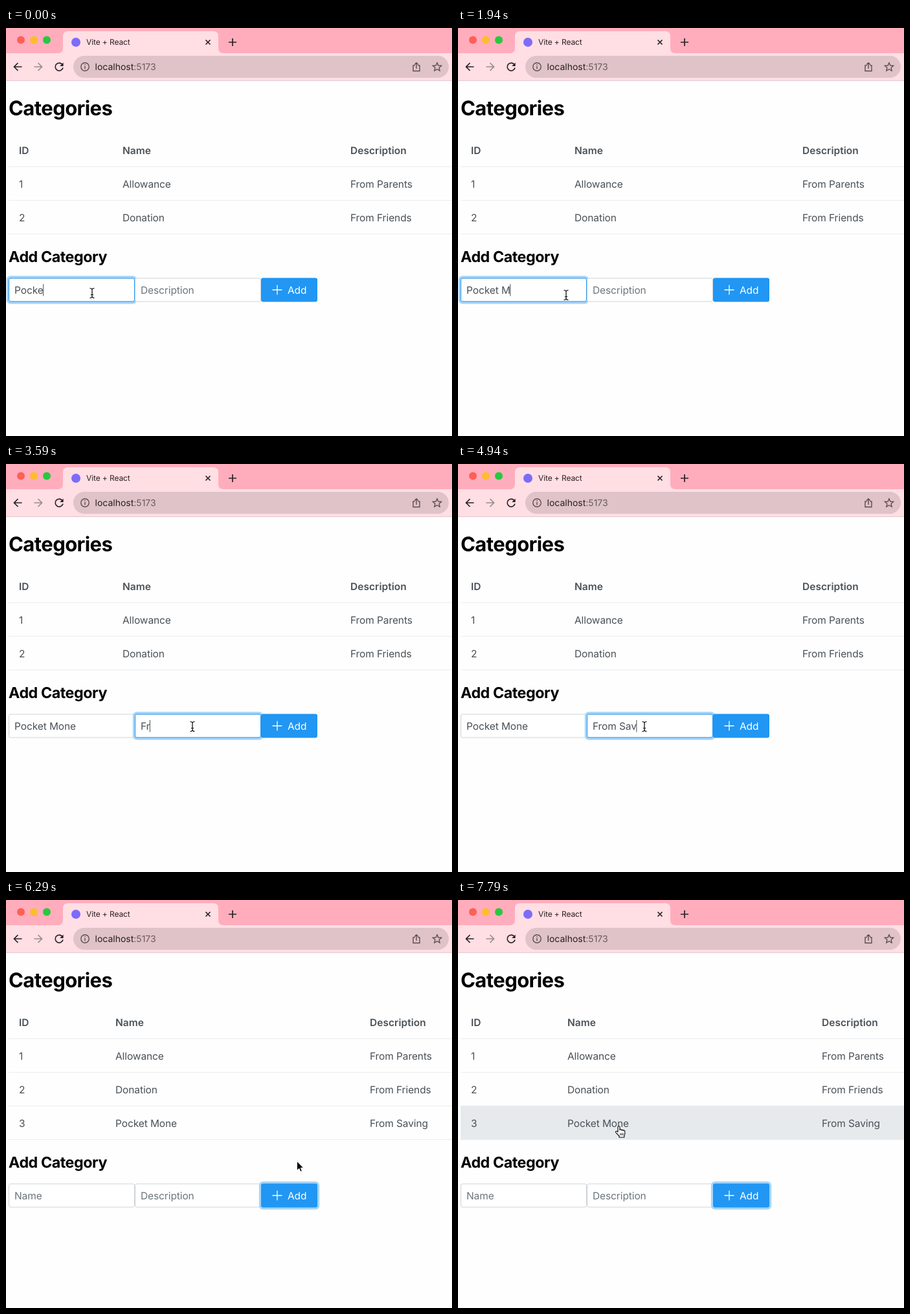
Write an HTML page that moves like this. It is 689 by 631 pixels and loops after 8 s.

```html
<!DOCTYPE html>
<html lang="en">
<head>
<meta charset="utf-8">
<title>Categories</title>
<style>
  html, body { margin: 0; width: 100%; height: 100%; overflow: hidden; background: #fefefe; }
  svg { position: absolute; left: 0; top: 0; display: block; }
  text {
    font: 15.5px Inter, "Open Sans", sans-serif;
    font-optical-sizing: none;
    letter-spacing: -.1px;
    text-rendering: geometricPrecision;
    white-space: pre;
    fill: #495057;
  }
  .th { font-weight: 600; letter-spacing: .05px; }
  .h1 { font-size: 31px; font-weight: 700; letter-spacing: -.58px; fill: #000; }
  .h2 { font-size: 23.3px; font-weight: 700; letter-spacing: -.46px; fill: #000; }
  .tab { font-size: 12px; fill: #2a2023; }
  .url { font-size: 14px; letter-spacing: 0; fill: #2a2023; }
  .port { fill: #6b5b5f; }
  .hint { fill: #6c757d; }
  .light { fill: #fff; }
  .line { fill: none; stroke: #2a2023; stroke-width: 1.7; }
  .rule { fill: none; stroke: #e9ecef; }
  .ring { fill: none; stroke: #a6d5fa; }
  .box { fill: #fff; stroke: #ced4da; }
  .active { fill: none; stroke: #2196f3; }
</style>
</head>
<body>
<svg width="689" height="631" viewBox="0 0 689 631">
  <!-- browser window -->
  <rect width="689" height="39" fill="#ffadbc"/>
  <rect y="39" width="689" height="42" fill="#ffdee4"/>
  <rect y="81" width="689" height="1" fill="#e4cbd0"/>
  <path d="M80 39q8 0 8-8V13q0-8 8-8H320q8 0 8 8V31q0 8 8 8z" fill="#ffdee4"/>
  <circle cx="23" cy="18.5" r="6" fill="#fe5f57"/>
  <circle cx="43" cy="18.5" r="6" fill="#febc2e"/>
  <circle cx="63" cy="18.5" r="6" fill="#28c840"/>
  <circle cx="108" cy="22" r="7" fill="#7d6bfa"/>
  <text class="tab" x="124" y="26.3">Vite + React</text>
  <path class="line" d="M308.5 18.5l7 7m0-7l-7 7"/>
  <path class="line" d="M344 22h12m-6-6v12" stroke-width="2"/>
  <path class="line" d="M24.5 60H12.5m6-6l-6 6l6 6"/>
  <path class="line" d="M43.5 60h12m-6-6l6 6l-6 6" style="stroke:#9d8a8e"/>
  <path class="line" d="M86.8 56.2A6 6 0 1 0 88 61.5"/>
  <path d="M88.6 53.6v5.4h-5.4z" fill="#2a2023"/>
  <rect x="104" y="43" width="580" height="34" rx="17" fill="#dfc3c8"/>
  <g class="line" style="stroke:#5d4d51;stroke-width:1.4">
    <circle cx="122" cy="60" r="6.2"/>
    <path d="M122 59v4.2m0-7.2v1.5"/>
    <path d="M631.5 58H629v8.500h10V58h-2.500M634 63V54m-3 2.700l3-3l3 3"/>
    <path d="M666 53.700l1.900 4.300l4.700.4l-3.500 3.100l1 4.600l-4.100-2.400l-4.100 2.400l1-4.600l-3.500-3.100l4.700-.4z"/>
  </g>
  <text class="url" x="137.500" y="65">localhost<tspan class="port">:5173</tspan></text>

  <!-- page -->
  <text class="h1" x="4" y="134.500">Categories</text>
  <rect id="rowHover" x="4" y="318.500" width="685" height="52" fill="#e6eaed"/>
  <path class="rule" d="M4 214.500H689M4 266.500H689M4 318.500H689"/>
  <g id="table"></g>
  <g id="form">
    <text class="h2" x="4" y="362">Add Category</text>
    <g id="fields"></g>
    <rect id="buttonRing" class="ring" x="394" y="386.500" width="87" height="37" rx="3"/>
    <rect id="button" x="394" y="386.500" width="87" height="37" rx="3"/>
    <path d="M411.500 405h15m-7.500-7.500v15" fill="none" stroke="#fff" stroke-width="1.300"/>
    <text class="light" x="435" y="411">Add</text>
  </g>

  <!-- pointers -->
  <g id="beam">
    <path d="M-3.500-7.500Q0-7.500 0-5Q0-7.500 3.500-7.500M0-5.500V5.500M-3.500 7.500Q0 7.500 0 5Q0 7.500 3.500 7.500M-2 2.500H2"
      fill="none" stroke="#000" stroke-width="1.200"/>
  </g>
  <path id="arrow" d="M.5 0V14.200L3.800 11.200L6 16.300L8.300 15.300L6.200 10.300H10.600z" fill="#000" stroke="#fff" stroke-width=".9"/>
  <g id="hand" stroke="#000" stroke-width="1.100" stroke-linejoin="round">
    <path fill="#fff" d="M-2 9V1.200a1.500 1.500 0 0 1 3 0V6a1.400 1.400 0 0 1 2.800 .3a1.400 1.400 0 0 1 2.600 .5a1.300 1.300 0 0 1 2.400 .7V11q0 2-1 3.500V17H0V15L-5 9.800q-1-1.600 .4-2.200q1.200-.4 2.600 1.400z"/>
    <path fill="none" stroke-width=".9" d="M1.800 10.500v3.500M4 10.500v3.500M6.100 10.500v3.500"/>
  </g>
</svg>
<script>
const LOOP = 8000;
const $ = id => document.getElementById(id);

function add(parent, tag, attrs, label = '') {
  const node = document.createElementNS('http://www.w3.org/2000/svg', tag);
  for (const key in attrs) node.setAttribute(key, attrs[key]);
  node.textContent = label;
  return parent.appendChild(node);
}

// Table: the two right columns move when the third row arrives.
const rows = [
  ['ID', 'Name', 'Description'],
  ['1', 'Allowance', 'From Parents'],
  ['2', 'Donation', 'From Friends'],
  ['3', 'Pocket Mone', 'From Saving']
].map((cells, r) => {
  const g = add($('table'), 'g', {});
  cells.forEach(c => add(g, 'text', { y: 194.6 + 52 * r, class: r ? '' : 'th' }, c));
  return g;
});
add(rows[3], 'path', { class: 'rule', d: 'M4 370.5H689' });

const fields = [['Name', 4], ['Description', 199]].map(([hint, x]) => {
  const g = $('fields');
  const frame = { x: x + .5, y: 387, width: 194, height: 36, rx: 2.5 };
  return {
    hint, x: x + 9,
    ring: add(g, 'rect', { class: 'ring', x, y: 386.5, width: 195, height: 37, rx: 3 }),
    box: add(g, 'rect', { class: 'box', ...frame }),
    active: add(g, 'rect', { class: 'active', ...frame }),
    text: add(g, 'text', { x: x + 9, y: 411 }),
    caret: add(g, 'rect', { y: 396, width: 1, height: 18.5, fill: '#495057' })
  };
});

// Each step changes only the listed parts. ring: name, description, button.
const at = (x, y, ptr) => ptr ? { x, y, ptr } : { x, y };
const steps = [
  [0, { name: 'Pocke', desc: '', caret: 0, ring: [1, 0, 0], over: 0, press: 0, row: 0, added: false, ...at(133, 410, 'beam') }],
  [450, at(152, 412)],
  [600, at(190, 415)],
  [750, at(176, 414)],
  [900, { caret: -1, ...at(167, 413) }],
  [1350, { caret: 0 }],
  [1500, { name: 'Pocket' }],
  [1640, { name: 'Pocket ' }],
  [1940, { name: 'Pocket M' }],
  [2090, { name: 'Pocket Mo' }],
  [2240, { name: 'Pocket Mon' }],
  [2390, { name: 'Pocket Mone' }],
  [2540, at(190, 411)],
  [2690, { over: .6, ...at(262, 407) }],
  [2840, { over: 1, caret: -1, ...at(288, 405) }],
  [2990, { ring: [.5, .5, 0], caret: 1, ...at(288, 406) }],
  [3140, { ring: [0, 1, 0] }],
  [3440, { desc: 'F' }],
  [3590, { desc: 'Fr' }],
  [3740, { desc: 'Fro' }],
  [3890, { desc: 'From' }],
  [4040, { desc: 'From ' }],
  [4340, { desc: 'From S' }],
  [4640, { desc: 'From Sa' }],
  [4940, { desc: 'From Sav' }],
  [5090, { desc: 'From Savi' }],
  [5240, { desc: 'From Savin' }],
  [5390, { desc: 'From Saving' }],
  [5690, at(312, 408)],
  [5840, at(385, 412)],
  [5990, { over: 0, press: .6, ...at(449, 404.5, 'hand') }],
  [6140, { press: 1, caret: -1, ring: [0, .5, 0] }],
  [6290, { name: '', desc: '', press: 0, ring: [0, 0, 1], added: true, ...at(449, 404, 'arrow') }],
  [7190, at(410, 394)],
  [7340, at(326, 371)],
  [7490, { row: .5, ...at(285, 359, 'hand') }],
  [7640, { row: 1, ...at(258, 352) }],
  [7790, at(249, 350)]
];

function setRing(node, amount) {
  node.style.strokeWidth = 6.4 * amount;
  node.style.opacity = amount;
}

function draw(s) {
  const columns = s.added ? [20, 169, 562] : [20, 180, 532];
  rows.forEach(g => g.querySelectorAll('text').forEach((t, i) => t.setAttribute('x', columns[i])));
  rows[3].style.display = s.added ? '' : 'none';
  $('rowHover').style.opacity = s.row;
  $('form').setAttribute('transform', `translate(0 ${s.added ? 52 : 0})`);

  fields.forEach((f, i) => {
    const value = i ? s.desc : s.name;
    f.text.textContent = value || f.hint;
    f.text.setAttribute('class', value ? '' : 'hint');
    setRing(f.ring, s.ring[i]);
    f.active.style.opacity = Math.max(s.ring[i], i ? s.over : 0);
    f.caret.style.display = s.caret === i ? '' : 'none';
    f.caret.setAttribute('x', f.x + (value ? f.text.getComputedTextLength() : 0) - .5);
  });

  setRing($('buttonRing'), s.ring[2]);
  const mix = (a, b) => Math.round(a + (b - a) * s.press);
  $('button').style.fill = `rgb(${mix(33, 13)},${mix(150, 132)},${mix(243, 228)})`;

  for (const id of ['beam', 'arrow', 'hand']) $(id).style.display = id === s.ptr ? '' : 'none';
  $(s.ptr).setAttribute('transform', `translate(${s.x} ${s.y})`);
}

const start = performance.now();
let shown = -1;

function tick() {
  const t = (performance.now() - start) % LOOP;
  const past = steps.filter(([from]) => from <= t);
  if (past.length !== shown) {
    shown = past.length;
    draw(Object.assign({}, ...past.map(([, change]) => change)));
  }
  requestAnimationFrame(tick);
}
tick();
</script>
</body>
</html>
```
